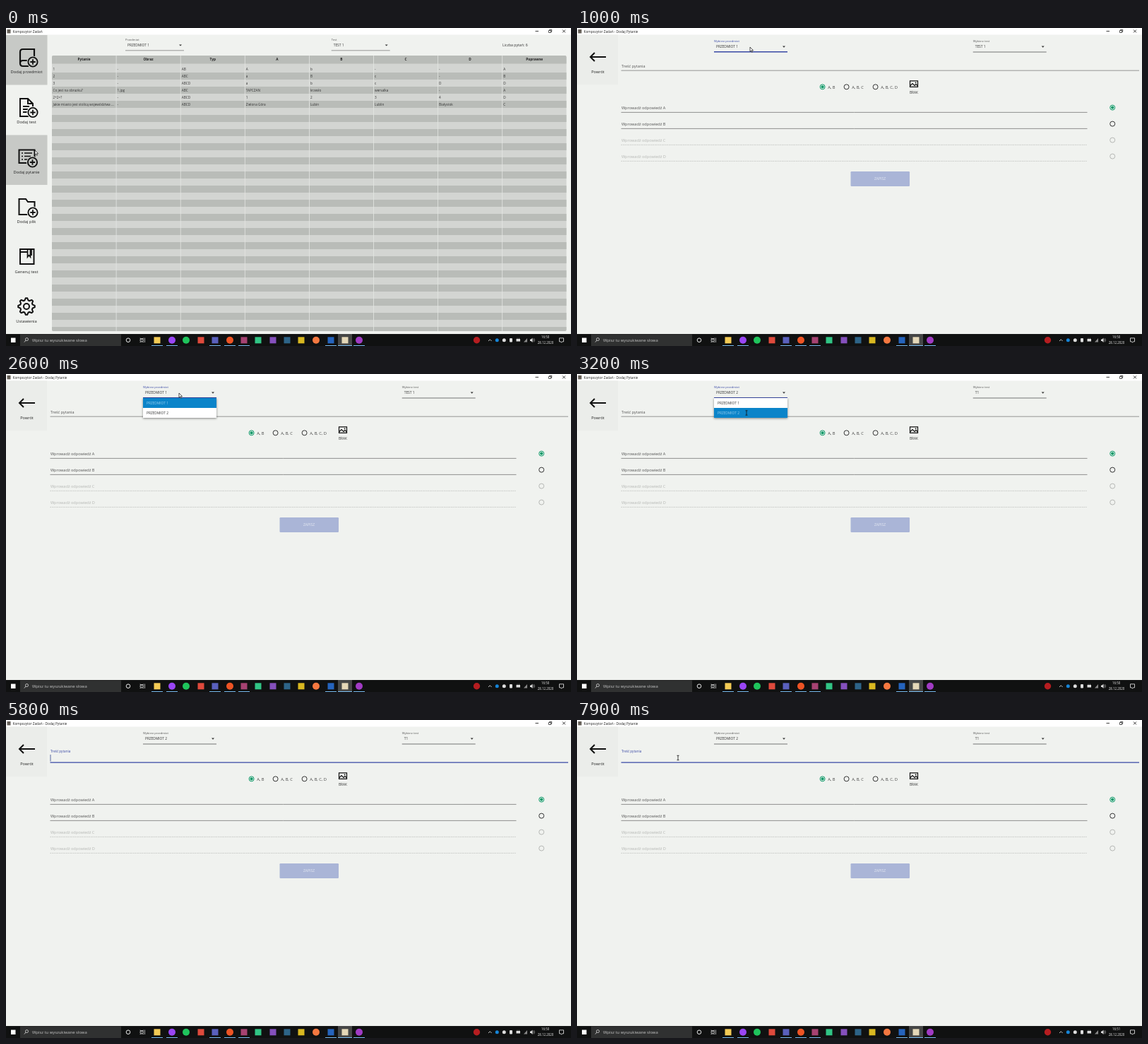
Recreate the animation shown at these times as an HTML page with a canvas. Size 800 by 450 pixels, loop 8 s.

```html
<!DOCTYPE html>
<html lang="pl">
<head>
<meta charset="utf-8">
<title>Kompozytor Zadań</title>
<style>
html, body { margin: 0; width: 100%; height: 100%; overflow: hidden; background: #f0f2ef; }
canvas { display: block; width: 800px; height: 450px; }
</style>
</head>
<body>
<canvas id="stage" width="800" height="450"></canvas>
<script>
const LOOP = 8000;
const g = document.getElementById('stage').getContext('2d');
const BG = '#f0f2ef', INK = '#333', BLUE = '#3949a5', GREEN = '#0b9a68';

function rect(x, y, w, h, color, radius = 0) {
  g.fillStyle = color;
  g.beginPath();
  g.roundRect(x, y, w, h, radius);
  g.fill();
}
function text(s, x, y, size, color = INK, align = 'left', weight = 400) {
  g.font = `${weight} ${size}px "Open Sans", "Noto Sans", sans-serif`;
  g.textAlign = align;
  g.textBaseline = 'alphabetic';
  g.fillStyle = color;
  g.fillText(s, x, y + size * 0.36);
}
function stroke(d, width = 1, color = '#111') {
  g.lineWidth = width;
  g.strokeStyle = color;
  g.stroke(new Path2D(d));
}
function fill(d, color) {
  g.fillStyle = color;
  g.fill(new Path2D(d));
}
function circle(x, y, r, color) {
  g.fillStyle = color;
  g.beginPath();
  g.arc(x, y, r, 0, 7);
  g.fill();
}
function ring(x, y, r, width, color) {
  g.lineWidth = width;
  g.strokeStyle = color;
  g.beginPath();
  g.arc(x, y, r, 0, 7);
  g.stroke();
}

function titleBar(title) {
  rect(0, 0, 800, 9.5, '#fff');
  rect(1.5, 2, 5, 5.5, '#655f58');
  text(title, 9.5, 4.8, 4.75, '#222');
  stroke('M749.5 4.5h4.5', 0.8);
  stroke('M768.5 3.5h3v3h-3zM769.7 3.3v-1h3v3h-1', 0.7);
  stroke('M788 2.5l4 4M792 2.5l-4 4', 0.8);
}

// Running apps carry a line below their mark: [x, color, running, round]
const APPS = [
  [214, '#f3cb55', 1], [235, '#9a45f5', 1, 1], [255, '#1fc45c', 0, 1], [276, '#df4a3c', 0],
  [296, '#5a60bd', 1], [317, '#ee5424', 1, 1], [337, '#a64272', 1], [357, '#31c585', 0],
  [378, '#8550bd', 0], [398, '#2d6488', 0], [418, '#d9b820', 0], [439, '#f57840', 0, 1],
  [460, '#2564bd', 1], [480, '#e5d8b8', 1], [500, '#a13bc4', 1, 1]
];

function taskbar(clock) {
  rect(0, 433, 800, 17, '#101111');
  rect(20, 433.5, 143, 16.5, '#303131');
  rect(7, 438.5, 6.5, 6.5, '#fff');
  ring(29.5, 440.5, 2, 0.8, '#ddd');
  stroke('M28 442l-2.2 2.6', 0.8, '#ddd');
  text('Wpisz tu wyszukiwane słowa', 37, 441.8, 5.87, '#c5c5c5');
  ring(173, 441.7, 2.8, 1, '#eee');
  stroke('M190 438.5v1h4.5v-1M190 445v-1h4.5v1M190 440.5h4.5v2.5h-4.5zM196.5 438.5v6.5', 0.7, '#ddd');
  rect(470, 433, 20, 17, '#454646');
  for (const [x, color, running, round] of APPS) {
    if (round) circle(x, 441.7, 5, color);
    else rect(x - 4.5, 437.3, 9, 9, color);
    if (running) rect(x - (x === 480 ? 10 : 8), 449, x === 480 ? 20 : 16, 1, '#76b9ed');
  }
  circle(666.5, 441.7, 4.7, '#b51d20');
  stroke('M683 443l2.3-2.3 2.3 2.3', 0.8, '#eee');
  circle(695.3, 441.8, 2.5, '#1685d8');
  circle(705.3, 441.8, 2.5, '#ddd');
  rect(713, 439, 4, 5.5, '#ddd', 1);
  rect(722.5, 440, 5.5, 3.5, '#ddd');
  stroke('M724 438.7v1M726.5 438.7v1', 0.7, '#ddd');
  fill('M733 444.5h5v-5.5z', '#888');
  fill('M742 440.5h1.5l2-2v6.5l-2-2H742z', '#ddd');
  stroke('M746.5 440q1.3 1.7 0 3.4M747.5 439q2.2 2.7 0 5.4', 0.5, '#ccc');
  text(clock, 763.7, 437.7, 4.4, '#eee', 'center');
  text('28.12.2020', 764, 445.3, 4.4, '#eee', 'center');
  stroke('M783.5 438.8h6v5h-2l-1 1.4-1-1.4h-2z', 0.8, '#eee');
}

function combo(x, y, width, label, value, focused) {
  const color = focused ? BLUE : '#555';
  text(label, x, y, 4.1, color);
  text(value, x + 3, y + 7.6, 4.85);
  fill(`M${x + width - 7} ${y + 6.6}h4l-2 2.2z`, '#333');
  rect(x, y + (focused ? 14 : 14.6), width, focused ? 1.4 : 0.8, focused ? BLUE : '#777');
}

function plusBadge(x, y) {
  circle(x, y, 8.6, g.badgeBack);
  ring(x, y, 6.6, 1.9, '#111');
  stroke(`M${x - 3.7} ${y}h7.4M${x} ${y - 3.7}v7.4`, 1.8);
}

function gear(x, y) {
  let d = '';
  for (let i = 0; i < 32; i++) {
    const a = (i - 1.5) * Math.PI / 16;
    const r = i % 4 === 1 || i % 4 === 2 ? 11.8 : 9;
    d += `${i ? 'L' : 'M'}${x + r * Math.cos(a)} ${y + r * Math.sin(a)}`;
  }
  stroke(d + 'z', 2);
  ring(x, y, 4, 2, '#111');
}

const MENU = [
  ['Dodaj przedmiot', 62, () => {
    stroke('M40 43V30H24q-4 0-4 4v16q0 4 4 4h8M20 50q0-4 4-4h9', 2.2);
    plusBadge(38, 48);
  }],
  ['Dodaj test', 132.5, () => {
    stroke('M33 125H20V100h11l7 7v8M31 100v7h7M24 111h9M24 115h7M24 119h6', 2);
    plusBadge(38, 119.5);
  }],
  ['Dodaj pytanie', 203.5, () => {
    stroke('M32 191H18.5V172.5H40.5V185', 2);
    stroke('M22 177h2M26 177h11M22 181.5h2M26 181.5h9M22 186h2M26 186h6', 1.7);
    plusBadge(37.5, 190);
  }],
  ['Dodaj plik', 274, () => {
    stroke('M32 264H18.5V242H28l3 4h9.5v10', 2);
    plusBadge(38, 261);
  }],
  ['Generuj test', 344.5, () => {
    stroke('M20 313H39.5V334H20zM20 317h11', 2);
    stroke('M30.5 312v12l2-2.5 2 2.5v-12M36 313v9', 1.7);
  }],
  ['Ustawienia', 414.5, () => gear(29, 394)]
];

const HEADERS = ['Pytanie', 'Obraz', 'Typ', 'A', 'B', 'C', 'D', 'Poprawne'];
const ROWS = [
  '1|-|AB|A|b|-|-|A',
  '2|-|ABC|a|B|c|-|B',
  '3|-|ABCD|a|b|c|D|D',
  'Co jest na obrazku?|1.jpg|ABC|TAPCZAN|krzesło|wersalka|-|A',
  '2+2=?|-|ABCD|1|2|3|4|D',
  'Jakie miasto jest stolicą województwa ...|-|ABCD|Zielona Góra|Lubin|Lublin|Białystok|C'
].map(row => row.split('|'));

function listView() {
  titleBar('Kompozytor Zadań');
  MENU.forEach(([label, y, icon], i) => {
    const active = i === 0 || i === 2;
    g.badgeBack = active ? '#c7c9c6' : BG;
    if (active) rect(0, y - 52, 58.5, 70.5, g.badgeBack);
    icon();
    text(label, 29, y, 5.75, '#222', 'center');
  });
  combo(169, 16.8, 83, 'Przedmiot', 'PRZEDMIOT 1');
  combo(460.7, 16.8, 83, 'Test', 'TEST 1');
  text('Liczba pytań: 6', 703, 24.4, 5.2);

  g.save();
  g.beginPath();
  g.roundRect(65, 39, 728.5, 390, 2);
  g.clip();
  rect(65, 39, 729, 391, '#d3d5d2');
  rect(65, 39, 729, 11.5, '#b9bcb8');
  for (let y = 63; y < 429; y += 20) rect(65, y, 729, 10, '#b9bcb8');
  HEADERS.forEach((name, i) => {
    const x = 65 + i * 91.1;
    if (i) rect(x - 0.4, 39, 0.8, 391, '#e4e6e3');
    text(name, x + 45.5, 44.6, 4.75, '#222', 'center', 700);
    ROWS.forEach((row, j) => text(row[i], x + 1.5, 58.2 + j * 10, 4.7));
  });
  g.restore();
}

function radio(x, y, on, color = '#333') {
  ring(x, y, 3.5, 1, on ? GREEN : color);
  if (on) circle(x, y, 2.1, GREEN);
}

function popup(x, items, selected) {
  g.save();
  g.shadowColor = '#0007';
  g.shadowBlur = 3;
  g.shadowOffsetY = 1;
  rect(x, 34, 104, items.length * 14, '#fff');
  g.restore();
  items.forEach((item, i) => {
    if (i === selected) rect(x, 34 + i * 14, 104, 14, '#0b84c9');
    text(item, x + 5, 41.2 + i * 14, 4.85, i === selected ? '#9bd0ef' : INK);
  });
}

// Pointer stops: time, x, y
const PATH = [
  [0, 41, 173], [300, 41, 173], [900, 245, 27], [1200, 245, 27], [1600, 608.5, 26.5],
  [1850, 608.5, 26.5], [2400, 245, 27], [2600, 245, 27], [2900, 240, 55], [3400, 240, 55],
  [3950, 600, 27], [4150, 600, 27], [4350, 596, 46], [5500, 596, 46], [5750, 143, 53.5],
  [LOOP, 143, 53.5]
];

function pointerAt(t) {
  const i = PATH.findIndex(stop => stop[0] > t);
  const [t0, x0, y0] = PATH[i - 1], [t1, x1, y1] = PATH[i];
  const p = (t - t0) / (t1 - t0), e = p * p * (3 - 2 * p);
  return [x0 + (x1 - x0) * e, y0 + (y1 - y0) * e];
}

function pointer(x, y, beam) {
  if (beam) {
    stroke(`M${x - 1.5} ${y - 3.2}h3M${x} ${y - 3.2}v6.4M${x - 1.5} ${y + 3.2}h3`, 0.8);
    return;
  }
  const d = `M${x} ${y}v6.4l1.5-1.3 1 2.3 1-.5-1-2.2h2z`;
  fill(d, '#fff');
  stroke(d, 0.7);
}

function formView(t, py) {
  const subjectOpen = t >= 2500 && t < 3300, testOpen = t >= 4100 && t < 5300;
  const picked = t >= 3100;
  titleBar('Kompozytor Zadań - Dodaj Pytanie');
  rect(0, 9.5, 58, 70.5, t < 1000 ? '#d5d7d4' : '#ebedea');
  stroke('M41 41H19M25 35l-6 6 6 6', 2);
  text('Powrót', 29.5, 62, 5.6, '#222', 'center');

  combo(194, 19, 104, 'Wybierz przedmiot', picked ? 'PRZEDMIOT 2' : 'PRZEDMIOT 1', t >= 1000 && t < 4050);
  combo(560.7, 19, 104, 'Wybierz test', picked ? 'T1' : 'TEST 1', t >= 4050 && t < 5650);

  const focus = Math.min(1, Math.max(0, (t - 5650) / 140));
  text('Treść pytania', 63, 53.6 - 9 * focus, 5.5 - 0.85 * focus, focus ? BLUE : '#555');
  rect(62.5, focus ? 59.4 : 59.8, 733.5, focus ? 1.4 : 0.8, focus ? BLUE : '#777');
  if (t >= 5790 && (t - 5790) % 1060 < 530) rect(62.6, 49, 0.8, 9.5, '#34468f');

  ['A, B', 'A, B, C', 'A, B, C, D'].forEach((label, i) => {
    const x = [347.6, 381.6, 422.6][i];
    radio(x, 83.3, i === 0);
    text(label, x + 7.7, 83.5, 5.75, '#444');
  });
  stroke('M471.5 74.8h11v8.6h-11zM471.5 82l3.5-3.5 3 3 2-2 2.5 2.5', 1.2);
  circle(479.6, 77.4, 0.9, '#111');
  text('BRAK', 477, 91.5, 4.75, '#333', 'center');

  [...'ABCD'].forEach((letter, i) => {
    const y = 112.6 + i * 23, off = i > 1;
    text('Wprowadź odpowiedź ' + letter, 63, y, 5.6, off ? '#b5b7b4' : '#555');
    g.setLineDash(off ? [1.5, 1] : []);
    stroke(`M62.5 ${y + 6.8}H722.5`, 0.8, off ? '#bbbdba' : '#777');
    g.setLineDash([]);
    radio(758.2, y, i === 0, off ? '#b5b7b4' : '#333');
  });
  rect(387.5, 203, 83.5, 21, '#aab5d7', 1.2);
  text('ZAPISZ', 429, 213.6, 5, '#e6e9f2', 'center');

  if (subjectOpen) popup(194, ['PRZEDMIOT 1', 'PRZEDMIOT 2'], py > 48 ? 1 : 0);
  if (testOpen) popup(560.7, ['T1'], 0);
  return testOpen || (subjectOpen && !picked);
}

function draw() {
  const t = performance.now() % LOOP;
  const [px, py] = pointerAt(t);
  rect(0, 0, 800, 450, BG);
  let blocked = true;
  if (t < 100) listView();
  else blocked = formView(t, py);
  taskbar(t < 6400 ? '16:50' : '16:51');
  if (t < 5760 || t > 5950) pointer(px, py, !blocked && py > 42 && py < 61 && px > 62);
  requestAnimationFrame(draw);
}
draw();
</script>
</body>
</html>
```
